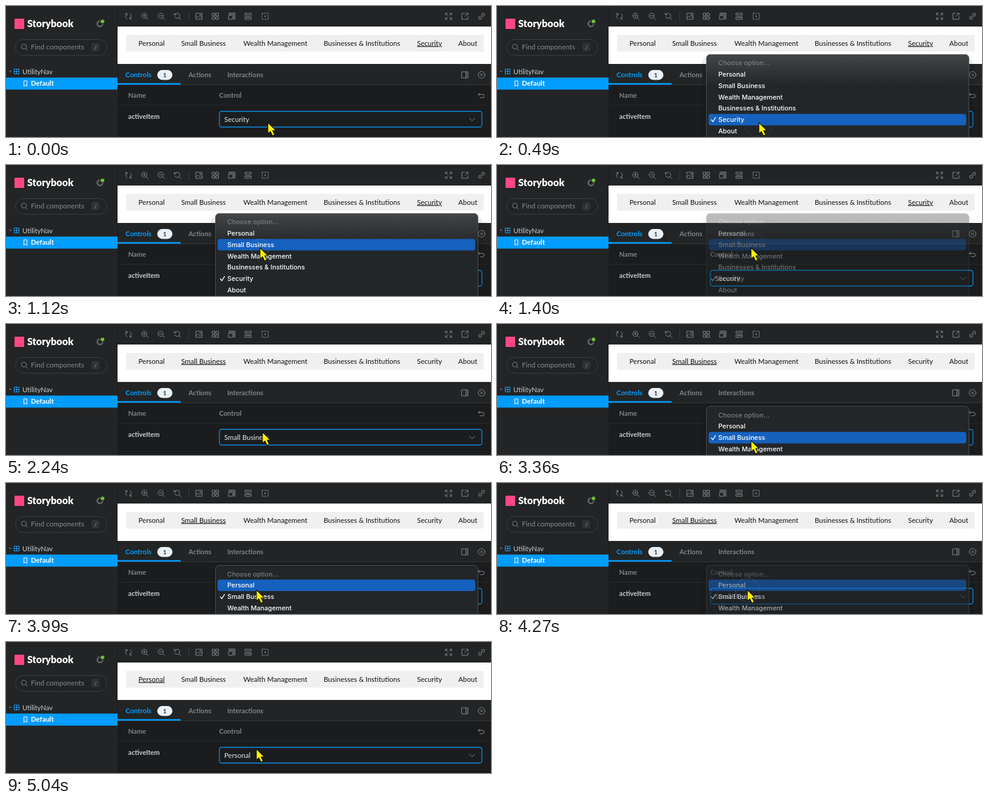
Recreate the animation shown at these times as an HTML page. Size 800 px wide and 217 px high, loop 5180 ms.

```html
<!DOCTYPE html>
<html lang="en">
<head>
<meta charset="utf-8">
<title>Utility nav controls</title>
<style>
html, body { margin: 0; width: 100%; height: 100%; overflow: hidden; background: #222425; }
svg { display: block; width: 800px; height: 217px; }
text { font: 11.4px Lato, "Open Sans", sans-serif; fill: #c9cdcf; white-space: pre; }
.bold { font-weight: 700; }
.dim { fill: #7f8488; }
.icon { fill: none; stroke: #84898c; stroke-width: 1; stroke-linecap: round; stroke-linejoin: round; }
#nav text { font-size: 11.5px; fill: #111; }
#nav .on { text-decoration: underline; }
#menu text { font: 500 10.75px Inter, "Noto Sans", sans-serif; fill: #fff; }
#menu .off { fill: #7b7e80; }
</style>
</head>
<body>
<svg viewBox="0 0 800 217">
  <defs>
    <!-- the white preview shines through the top of a menu -->
    <linearGradient id="glow" gradientUnits="userSpaceOnUse" x1="0" y1="80" x2="0" y2="132">
      <stop offset="0" stop-color="#434547"/>
      <stop offset="1" stop-color="#232628"/>
    </linearGradient>
  </defs>

  <!-- surfaces -->
  <rect width="800" height="217" fill="#222425"/>
  <rect x="184" y="131" width="616" height="86" fill="#1b1c1e"/>
  <rect x="184" y="130" width="616" height="1" fill="#36393b"/>
  <rect x="184" y="164" width="616" height="1" fill="#27292b"/>
  <rect x="184" width="1" height="217" fill="#191b1c"/>
  <rect x="184" y="34" width="616" height="62" fill="#fff"/>
  <rect x="198" y="48" width="590" height="27.5" fill="#f0f0f0"/>

  <!-- sidebar -->
  <rect x="14" y="21" width="16" height="17" rx="1" fill="#ff4785"/>
  <text x="35" y="35" class="bold" style="font-size:16.2px;font-weight:900;fill:#fff">Storybook</text>
  <g class="icon" transform="translate(155 29.5)">
    <circle r="5.2" stroke-dasharray="2.6 1.48"/>
    <circle r="4"/>
  </g>
  <circle cx="159.2" cy="25.5" r="3.9" fill="#66bf3c" stroke="#222425" stroke-width="1.6"/>
  <rect x="15.5" y="55.5" width="151" height="26" rx="13" fill="#212324" stroke="#3c4042"/>
  <g class="icon" transform="translate(30.3 68)"><circle cx="-.7" cy="-.7" r="4"/><path d="M2.3 2.3 5.2 5.2"/></g>
  <text x="41" y="72" style="font-size:11.6px;fill:#878c8f">Find components</text>
  <rect x="141" y="61" width="13" height="14" rx="3" fill="#2f3234"/>
  <text x="145.5" y="71.5" style="font-size:9.5px;fill:#969b9e">/</text>
  <path d="M4.5 107h5l-2.5 3z" fill="#5d6265"/>
  <path d="M13.5 104.5h8v8h-8zM17.5 104.5v8M13.5 108.5h8" fill="none" stroke="#18a0fb"/>
  <text x="27" y="112.5" style="font-size:11.3px">UtilityNav</text>
  <rect y="118.5" width="184" height="20" fill="#029cfd"/>
  <path d="M29.5 124h5v9l-2.5-2.2-2.5 2.2z" fill="none" stroke="#fff"/>
  <text x="41" y="132.3" class="bold" style="fill:#fff">Default</text>

  <!-- toolbar -->
  <g class="icon">
    <g transform="translate(202 17)"><path d="M-2.5 4.2A4.9 4.9 0 0 1-2.5-4.2M2.5-4.2A4.9 4.9 0 0 1 2.5 4.2M-5.2-4.6h2.9v2.9M5.2 4.6H2.3V1.7"/></g>
    <g transform="translate(229 17)"><circle cx="-.8" cy="-.8" r="4.3"/><path d="M2.4 2.4 5.6 5.6M-2.8-.8h4M-.8-2.8v4"/></g>
    <g transform="translate(256 17)"><circle cx="-.8" cy="-.8" r="4.3"/><path d="M2.4 2.4 5.6 5.6M-2.8-.8h4"/></g>
    <g transform="translate(283 17)"><path d="M-4.6-2.8A4.3 4.3 0 1 1-4.8.8M-5.4-5.2v2.8h2.8M2.4 2.4 5.6 5.6"/></g>
    <path d="M301.5 10v14" stroke="#3b3f41"/>
    <g transform="translate(318.5 17)"><path d="M-5-5H5V5H-5zM-5 2.5-2-.5 1 2.5 3 .5 5 2.5"/><circle cx="2" cy="-2" r="1"/></g>
    <g transform="translate(345.5 17)"><path d="M-5-5h4v4h-4zM1-5h4v4H1zM-5 1h4v4h-4zM1 1h4v4H1z"/></g>
    <g transform="translate(372.5 17)"><path d="M-5-1.5h6.5V5H-5zM-5-3.4H3.3V5M-5-5.3H5.2V5"/></g>
    <g transform="translate(399.5 17)"><path d="M-5-5H5v3H-5zM-5 1H5v4H-5zM-2.5 1v1.8M0 1v1.8M2.5 1v1.8"/></g>
    <g transform="translate(427.5 17)"><path d="M-5-5H5V5H-5z" stroke-dasharray="1.7 1.63"/><path d="M-1 0h2M0-1v2"/></g>
    <g transform="translate(730 17)"><path d="M-5-2v-3h3M2-5h3v3M5 2v3H2M-2 5h-3V2M-5-5l3.5 3.5M5-5 1.5-1.5M5 5 1.5 1.5M-5 5l3.5-3.5"/></g>
    <g transform="translate(757 17)"><path d="M-.5-5H-5V5H5V.5M2-5h3v3M5-5 0 0"/></g>
    <g transform="translate(784.5 17) rotate(-45)"><path d="M-1.5-2.2h-2.2a2.2 2.2 0 0 0 0 4.4h2.2M1.5-2.2h2.2a2.2 2.2 0 0 1 0 4.4H1.5M-2.2 0h4.4"/></g>
    <g transform="translate(757 114)"><path d="M-5-5H5V5H-5zM1.5-5V5M3-2.5h.6M3 0h.6M3 2.5h.6"/></g>
    <g transform="translate(784.5 114)"><circle r="5.5"/><path d="M-2-2 2 2M2-2-2 2"/></g>
    <g transform="translate(784 148)"><path d="M-2.6-4-5-1.6l2.4 2.4M-5-1.6h7a2.8 2.8 0 0 1 0 5.6h-4"/></g>
  </g>

  <!-- preview and panel -->
  <g id="nav"></g>
  <rect x="184" y="127.7" width="104" height="2.6" fill="#029cfd"/>
  <text x="197" y="117.6" class="bold" style="fill:#029cfd">Controls</text>
  <rect x="249.5" y="106" width="25" height="16.4" rx="8.2" fill="#e8f1f8"/>
  <text x="262" y="117.8" class="bold" text-anchor="middle" style="font-size:10px;fill:#333">1</text>
  <text x="301" y="117.6" class="bold dim" style="font-size:11.1px">Actions</text>
  <text x="365" y="117.6" class="bold dim" style="font-size:11.15px">Interactions</text>
  <text x="201.5" y="152" class="bold dim" style="font-size:11.2px">Name</text>
  <text x="351.5" y="152" class="bold dim" style="font-size:11.1px">Control</text>
  <text x="201.5" y="186.5" class="bold" style="font-size:11.1px">activeItem</text>
  <rect x="352" y="174.5" width="433" height="26" rx="3.5" fill="#1b1c1e" stroke="#0a92ea" stroke-width="1.3"/>
  <text id="value" x="360" y="191.6" style="font-size:11.5px;fill:#e6e8e9"></text>
  <path d="M764.5 186l4.3 4.2 4.3-4.2" class="icon"/>

  <g id="menu">
    <rect x="337" y="5" width="449" height="160" rx="11" fill="#000" opacity=".07"/>
    <rect x="345.5" y="0" width="433" height="150" rx="6" fill="url(#glow)" stroke="#55585a" stroke-width=".8"/>
    <rect id="hot" x="349" width="425" height="19" rx="4" fill="#1561bd"/>
    <path id="tick" d="M353.6.3l2.5 3 4.3-7" fill="none" stroke="#fff" stroke-width="1.35" stroke-linecap="round"/>
  </g>
  <circle id="ring" fill="#4b8fd6" fill-opacity=".12" stroke="#5b97d2" stroke-width="1.2"/>
  <path id="arrow" d="M0 0V18.4L4.1 14.8 7.5 21.9 11.2 20.2 7.8 13.3H13.2Z" fill="#fff100" stroke="#111" stroke-width="1.1" stroke-linejoin="round"/>
</svg>
<script>
const LOOP = 5180, STEP = 70, ROW = 18.73, FIRST = 14.3;
const $ = id => document.getElementById(id);

const items = ["Personal", "Small Business", "Wealth Management",
  "Businesses & Institutions", "Security", "About"];
const navX = [218.5, 289, 391.5, 524, 678, 746];

// time, x, y of the pointer tip
const path = [[0, 432, 193], [490, 432, 193], [980, 419, 137], [1680, 419, 137],
  [1960, 422, 180], [2170, 422, 180], [2240, 423, 179], [2450, 423, 179],
  [2660, 419, 193], [3430, 419, 193], [3850, 413, 177], [LOOP, 413, 177]];

// menus: opening time, start and end of the fade, top edge, ticked item
const menus = [
  { open: 350, fade: 1260, end: 1540, top: 80.3, ticked: 4 },
  { open: 2730, fade: 4200, end: 4480, top: 136.5, ticked: 1 }
];
const clicks = [140, 1050, 2590, 4060];

function addText(parent, str, x, y) {
  const el = document.createElementNS("http://www.w3.org/2000/svg", "text");
  el.textContent = str;
  el.setAttribute("x", x);
  el.setAttribute("y", y);
  parent.append(el);
  return el;
}

const links = items.map((str, i) => addText($("nav"), str, navX[i], 65.6));
["Choose option...", ...items].forEach((str, i) => {
  const el = addText($("menu"), str, 365, FIRST + i * ROW + 3.9);
  if (!i) el.setAttribute("class", "off");
});

function pointerAt(t) {
  const i = path.findIndex((p, n) => n && t <= p[0]);
  const [t0, x0, y0] = path[i - 1], [t1, x1, y1] = path[i];
  const k = (t - t0) / (t1 - t0), e = k * k * (3 - 2 * k);
  return [x0 + (x1 - x0) * e, y0 + (y1 - y0) * e];
}

function drawMenu(t, y) {
  const m = menus.find(m => t >= m.open && t < m.end);
  $("menu").style.display = m ? "" : "none";
  if (!m) return;
  const hot = Math.round((y - m.top - FIRST) / ROW);
  const alpha = t < m.fade ? 1 : 1 - (t - m.fade + 40) / (m.end - m.fade);
  $("menu").setAttribute("transform", `translate(0 ${m.top})`);
  $("glow").setAttribute("gradientTransform", `translate(0 ${-m.top})`);
  $("menu").setAttribute("opacity", Math.max(0, alpha));
  $("hot").setAttribute("y", FIRST + hot * ROW - 9.5);
  $("tick").setAttribute("transform", `translate(0 ${FIRST + (m.ticked + 1) * ROW})`);
}

function drawRing(t, x, y) {
  const start = clicks.find(c => t >= c && t < c + 490);
  const k = start === undefined ? 1 : (t - start) / 490;
  $("ring").setAttribute("cx", x);
  $("ring").setAttribute("cy", y);
  $("ring").setAttribute("r", 12 + 18 * k);
  $("ring").setAttribute("opacity", 0.35 * (1 - k));
}

function draw(t) {
  const [x, y] = pointerAt(t);
  const active = t < menus[0].end ? 4 : t < menus[1].end ? 1 : 0;
  links.forEach((el, i) => el.setAttribute("class", i === active ? "on" : ""));
  $("value").textContent = items[active];
  drawMenu(t, y);
  drawRing(t, x, y);
  $("arrow").setAttribute("transform", `translate(${x} ${y})`);
}

const start = performance.now();
function tick() {
  const t = (performance.now() - start) % LOOP;
  draw(Math.floor(t / STEP) * STEP);
  requestAnimationFrame(tick);
}
draw(0);
requestAnimationFrame(tick);
</script>
</body>
</html>
```
